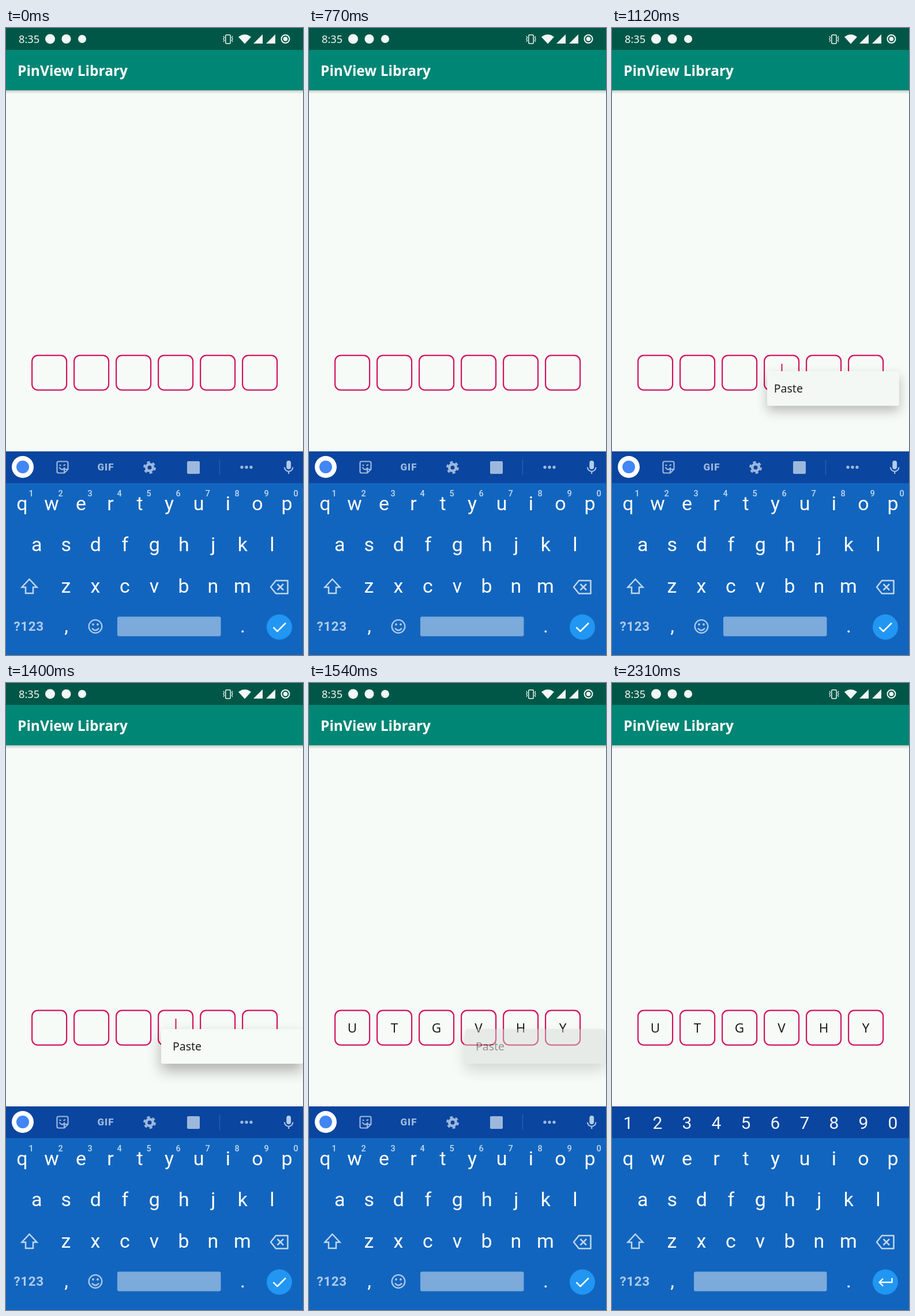
An HTML page for the animation above (2660 ms loop, 515 by 1087 pixels).

```html
<!DOCTYPE html>
<html lang="en">
<head>
<meta charset="utf-8">
<title>PinView Library</title>
<style>
  html, body { margin: 0; width: 100%; height: 100%; overflow: hidden; background: #f7fbf7; }
  svg { position: absolute; left: 0; top: 0; width: 515px; height: 1087px; }
  .ui { font-family: "Noto Sans", "Open Sans", sans-serif; }
  .keys { font-family: Roboto, Arial, sans-serif; }
  .line { fill: none; stroke-linejoin: round; }
  #popup {
    position: absolute; overflow: hidden; height: 60px;
    font: 19.5px/60px "Noto Sans", "Open Sans", sans-serif; color: #1d1f1e;
  }
  #popup span { position: absolute; top: 0; white-space: nowrap; }
  #keyboard { z-index: 2; }
</style>
</head>
<body>
<svg viewBox="0 0 515 1087" class="ui">
  <defs>
    <linearGradient id="shade" x2="0" y2="1">
      <stop stop-color="#000" stop-opacity=".2"/>
      <stop offset="1" stop-color="#000" stop-opacity="0"/>
    </linearGradient>
  </defs>
  <rect width="515" height="1087" fill="#f7fbf7"/>
  <rect y="108" width="515" height="6" fill="url(#shade)"/>
  <rect width="515" height="108" fill="#008675"/>
  <rect width="515" height="38" fill="#015747"/>
  <text x="20" y="83" font-size="24.5" font-weight="600" fill="#fff">PinView Library</text>

  <g fill="#f2f8f6">
    <text x="22" y="26" font-size="18.3">8:35</text>
    <circle cx="76.5" cy="19" r="8.5"/>
    <circle cx="104.500" cy="19" r="8"/>
    <circle cx="132" cy="19" r="7"/>
    <path d="M403 15.500Q414 7 425 15.500L414 27.500ZM445 11V27H429ZM467 11V27H451Z"/>
    <circle cx="484.500" cy="19" r="3.800"/>
  </g>
  <g class="line" stroke="#f2f8f6">
    <rect x="380.800" y="12" width="8.400" height="15" rx="1.500" stroke-width="1.500"/>
    <path d="M377 14l1.500 2.500-1.500 2.500 1.500 2.500-1.500 2.500M393 14l-1.500 2.500 1.500 2.500-1.500 2.500 1.500 2.500" stroke-width="1.300"/>
    <circle cx="484.500" cy="19" r="7" stroke-width="2"/>
  </g>

  <g id="boxes" class="line" stroke="#d2145f" stroke-width="2.2"></g>
  <g id="letters" font-size="22.5" fill="#1b1d1c" text-anchor="middle"></g>
  <path id="cursor" d="M294.500 582V614" stroke="#d2145f" stroke-width="2"/>
</svg>

<div id="popup"><span>Paste</span></div>

<svg id="keyboard" class="keys" viewBox="0 0 515 1087">
  <rect y="734" width="515" height="353" fill="#1265be"/>
  <rect y="734" width="515" height="55" fill="#0a459f"/>
  <g id="keys" fill="#fff" text-anchor="middle"></g>

  <g class="line" stroke="#bfd7f0" stroke-width="2.5">
    <path d="M40.500 955.500L53.500 969.500H47V980H34V969.500H27.500Z" stroke-linejoin="miter"/>
    <path d="M468 958H488.500V980.500H468L459 969.200ZM470.500 964l10.500 10.500M481 964l-10.500 10.500"/>
  </g>
  <text x="13.500" y="1045" font-size="22.500" font-weight="700" letter-spacing=".6" fill="#aecbea">?123</text>
  <rect id="space" y="1020.500" height="34" rx="3" fill="#7baadb"/>
  <circle cx="474" cy="1038.500" r="22" fill="#2196f3"/>

  <g id="tools">
    <circle cx="29" cy="761" r="19" fill="#fff"/>
    <circle cx="29" cy="761" r="11" fill="#4285f4"/>
    <g class="line" stroke="#9db8dd" stroke-width="2.200">
      <path d="M101 771.500H91Q88.500 771.500 88.500 769V754Q88.500 751.500 91 751.500H105Q107.500 751.500 107.500 754V765ZM101 771V765H107"/>
      <path d="M92.500 761.500Q97 769 102 762M92.500 757.500l3 1M99.500 758.500l3.500-1.500"/>
      <circle cx="249" cy="762" r="5.800" stroke-width="4.600"/>
      <circle cx="249" cy="762" r="9.300" stroke-width="3.200" stroke-dasharray="5 4.739"/>
    </g>
    <text x="173" y="767" font-size="17" font-weight="900" letter-spacing="1" fill="#9db8dd" text-anchor="middle">GIF</text>
    <rect x="314" y="751" width="22" height="22" rx="2" fill="#9db8dd"/>
    <path d="M370.500 748V775" stroke="#2a5da6" stroke-width="1.500"/>
    <g fill="#9db8dd">
      <circle cx="409" cy="761.500" r="2.700"/>
      <circle cx="417" cy="761.500" r="2.700"/>
      <circle cx="425" cy="761.500" r="2.700"/>
    </g>
    <rect x="486.300" y="750" width="7.800" height="15" rx="3.900" fill="#b4cbe8"/>
    <path class="line" d="M483 761.500a7.200 7.200 0 0 0 14.400 0M490.200 768.500V773" stroke="#b4cbe8" stroke-width="2"/>
    <g id="hints" fill="#c6daf2" font-size="14.500" font-weight="500" text-anchor="middle"></g>
    <g class="line" stroke="#aecbea" stroke-width="2.300">
      <circle cx="155" cy="1037.500" r="11.300"/>
      <path d="M149 1040.500Q155 1048 161 1040.500"/>
    </g>
    <g fill="#aecbea">
      <circle cx="151" cy="1034" r="1.900"/>
      <circle cx="159" cy="1034" r="1.900"/>
    </g>
    <path class="line" d="M463.500 1039l7 7 14.500-14.500" stroke="#fff" stroke-width="2.500"/>
  </g>
  <g id="numbers">
    <g id="digits" fill="#f2f6fb" font-size="30" text-anchor="middle"></g>
    <path class="line" d="M485.500 1031.500V1039H463.500M470 1032.500L463.500 1039l6.500 6.500" stroke="#fff" stroke-width="2.400"/>
  </g>
</svg>

<script>
const LOOP = 2660;
const $ = id => document.getElementById(id);

function add(parent, tag, attrs, text = '') {
  const el = document.createElementNS('http://www.w3.org/2000/svg', tag);
  for (const name in attrs) el.setAttribute(name, attrs[name]);
  el.textContent = text;
  parent.append(el);
}

function row(parent, chars, x, y, step = 51, size) {
  [...chars].forEach((c, i) => {
    const attrs = { x: x + step * i, y };
    if (size) attrs['font-size'] = size;
    add(parent, 'text', attrs, c);
  });
}

for (let i = 0; i < 6; i++)
  add($('boxes'), 'rect', { x: 45.1 + 73 * i, y: 567.7, width: 60, height: 60, rx: 10 });
row($('letters'), 'UTGVHY', 75, 606, 73);
row($('keys'), 'qwertyuiop', 28, 836, 51, 34);
row($('keys'), 'asdfghjkl', 53.3, 907, 51, 34);
row($('keys'), 'zxcvbnm', 104, 979, 51, 34);
row($('keys'), ',.', 104.5, 1048, 306, 34);
row($('hints'), '1234567890', 43.5, 812);
row($('digits'), '1234567890', 28, 773);

// start ms, popup reveal, opacity, fill, side curve, shadow strength
const steps = [
  [0, 0, 0, '#fff', 0, 0],
  [980, .32, .35, '#e9ebe9', 0, .1],
  [1050, .7, .75, '#e9ebe9', 0, .2],
  [1120, .93, 1, '#f4f8f5', 0, .25],
  [1190, 1, 1, '#f7fbf8', 0, .3],
  [1470, 1, .89, '#d4d8d4', 1, .3],
  [1540, 1, .45, '#d4d8d4', 1, .3],
  [1610, 0, 0, '#fff', 0, 0]
];

const show = (id, on) => { $(id).style.display = on ? '' : 'none'; };
const popup = $('popup');
const label = popup.firstChild;

function draw(t) {
  const [, reveal, alpha, fill, curved, shadow] = steps.filter(s => s[0] <= t).pop();
  const rest = 1 - reveal;
  Object.assign(popup.style, {
    display: alpha ? '' : 'none',
    left: 269 + 6 * rest + 'px',
    top: 600 - 73 * rest + 'px',
    width: 246 * reveal + 'px',
    opacity: alpha,
    background: fill,
    borderRadius: curved ? '4px / 30px' : '3px',
    boxShadow: `0 ${12 * reveal ** 4}px ${24 * reveal ** 3}px rgba(0,0,0,${shadow})`
  });
  label.style.left = 20 - 123 * rest + 'px';

  const pasted = t >= 1470, numeric = t >= 1610;
  show('cursor', t >= 980 && !pasted);
  show('letters', pasted);
  show('tools', !numeric);
  show('numbers', numeric);
  const left = numeric ? 142 : 193;
  $('space').setAttribute('x', left);
  $('space').setAttribute('width', 372.5 - left);
}

const start = performance.now();
function tick() {
  draw((performance.now() - start) % LOOP);
  requestAnimationFrame(tick);
}
tick();
</script>
</body>
</html>
```
